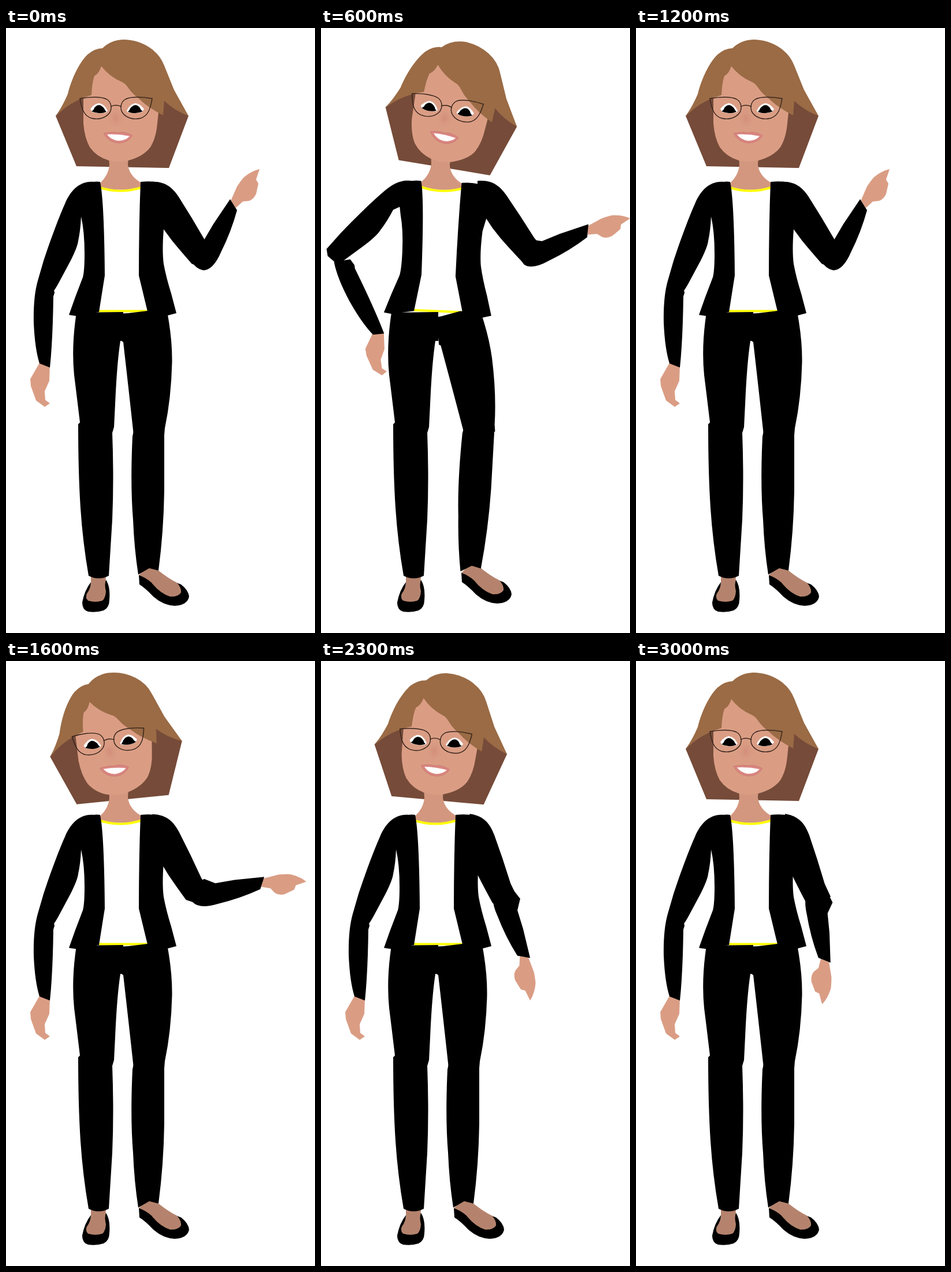
Recreate the animation shown at these times as an HTML page. Size 535x1046 px, loop 3100 ms.

```html
<!DOCTYPE html>
<html lang="en">
<head>
<meta charset="utf-8">
<title>Presenter</title>
<style>
  html, body { margin: 0; width: 100%; height: 100%; overflow: hidden; background: #fff; }
  svg { display: block; width: 100%; height: 100%; }
  .skin { fill: #da9d84; }
  .neck { fill: #d3977f; }
  .foot { fill: #b5836d; }
  .white { fill: #fff; }
  .hair { fill: #9a6b45; }
  .line { fill: none; stroke: #33221a; stroke-width: 1.4; }
</style>
</head>
<body>
<svg viewBox="0 0 535 1046">
  <defs>
    <radialGradient id="blush">
      <stop offset="0" stop-color="#d28d79"/>
      <stop offset="1" stop-color="#da9d84" stop-opacity="0"/>
    </radialGradient>
    <path id="lens" d="M128 122C144 119 164 118 174 123C183 128 184 140 179 147C172 156 160 159 148 156C135 152 131 140 128 122Z"/>
    <g id="eye">
      <path class="white" d="M146 140Q154 130 161 130Q170 131 176 143L174 146Q161 149 149 145Z"/>
      <path d="M148 144Q152 142 153 138Q161 128 170 139Q171 142 174 145Q161 150 148 144Z"/>
    </g>
  </defs>

  <!-- left foot -->
  <path class="foot" d="M147 949L147 962L138 982L142 992L168 992L174 980L172 964L173 949Z"/>
  <path d="M147 958Q136 972 132 993Q132 1006 142 1009Q157 1011 169 1007Q179 1002 179 989Q181 966 173 954Q170 962 173 974Q172 986 167 990Q155 994 142 990Q137 985 140 978Q147 968 147 958Z"/>

  <g data-part="torso">
    <path class="white" d="M163 268L233 268L231 330L230 428L245 489L244 499L161 499L171 428L169 340Z"/>
    <path fill="#ffff00" d="M162 273Q198 286 234 273L234 278Q198 289 162 278ZM161 487.5H245V491.5H161Z"/>
    <g data-part="head">
      <path fill="#764b39" d="M86 152L122 239L282 242L316 152L260 90L130 90Z"/>
    </g>
    <path class="neck" d="M178 222L179 236Q178 254 163 268L163 274Q198 285 233 274L233 267Q213 255 211 236L212 222Z"/>
    <path d="M163 266Q148 264 134 272L126 300L130 326Q136 352 136 390Q136 420 133 431L120 465L109 496L122 498L161 491L171 428Q170 300 163 266Z"/>
    <path d="M233 266Q262 263 275 272L285 300L273 348Q270 385 273 408Q277 430 286 459L295 493L280 497L245 490L230 428Q230 340 233 266Z"/>
    <g data-part="head">
      <path class="skin" d="M134 118L134 165Q136 190 145 206Q157 223 178 229Q195 233 212 229Q238 222 250 206Q260 190 262 165L267 118L220 60L150 60Z"/>
      <ellipse cx="190" cy="156" rx="17" ry="22" fill="url(#blush)"/>
      <path class="hair" d="M86 153Q99 133 107 114C114 86 127 60 141 46Q154 35 167 35Q181 21 203 20Q228 20 249 34Q267 46 274 65L291 107L316 152Q292 143 274 126L272 151Q245 137 230 122Q219 114 212 104Q206 95 200 93Q179 84 165 66Q161 79 153 83Q149 94 148 116Q110 127 86 153Z"/>
      <use href="#eye"/>
      <use href="#eye" transform="translate(385) scale(-1 1)"/>
      <g class="line">
        <use href="#lens"/>
        <use href="#lens" transform="translate(381) scale(-1 1)"/>
        <path d="M181 136Q190 131 200 136"/>
      </g>
      <path fill="#d98580" stroke="#c9776f" stroke-width=".8" d="M169 182Q178 180 187 180Q194 182 200 180Q212 181 219 186Q211 199 195 199Q177 198 169 182Z"/>
      <path class="white" d="M175 184Q195 183 214 187Q207 195 194 195Q181 193 175 184Z"/>
    </g>
  </g>

  <!-- legs and right foot -->
  <path d="M122 492L203 491L203 541L198 541Q192 580 189 650L187 690L184 700Q187 780 184 850L178 947Q160 956 143 947Q133 890 129 830Q125 770 125 685L128 682Q123 640 118 600Q113 550 122 492Z"/>
  <g data-part="foot">
    <path d="M230 946L231 962Q242 969 255 983Q272 998 292 999Q314 998 317 983Q316 972 303 962L270 950Z"/>
    <path class="foot" d="M230 946L246 930L262 931L264 938Q280 951 296 959Q304 968 303 976Q298 984 284 983Q266 977 252 959Q242 950 230 946Z"/>
  </g>
  <path data-part="shin" d="M221 697L219 706Q215 790 220 850Q222 900 229 945L248 934L264 938Q273 870 274 800L274 698Z"/>
  <path data-part="thigh" d="M203 493.5L212 493L245 489L280 496Q288 540 287.5 578Q286 640 275 692L274 704L221 704Q213 630 203 543L200 541Z"/>

  <!-- arms -->
  <g data-part="foreL">
    <path data-part="handL" class="skin" d="M58 579L42 607L43 619L52 644L67 655L76 649L68 643L67 628L75 610L76 583Z"/>
    <path d="M55 437Q47 465 48 510Q50 555 58 580L76 587Q81 540 82 464L84 458L82 446Z"/>
  </g>
  <path data-part="upperL" d="M152 266C127 264 111 282 102 304C89 333 73 378 64 406L55 437L62 447L84 453L90 443L112 402Q124 378 125 368Q129 350 130 326L152 300Z"/>
  <g data-part="foreR">
    <path data-part="handR" class="skin" d="M389 299L400 274Q408 262 412 258Q425 247 439 244L433 262L437 269L433 287Q428 297 420 299L410 300L398 311Z"/>
    <path d="M324 378L342 368L359 339L388 296L400 315Q390 352 372 388Q359 418 342 419Q329 417 320 402Z"/>
  </g>
  <path data-part="upperR" d="M250 266C276 264 289 277 299 292L322 329L345 368L360 387L354 394L340 412L322 408Q300 383 287 367L273 348L250 310Z"/>
</svg>
<script>
  const STEP = 100, LOOP = 3100, STEPS_PER_POSE = 6;
  const still = [0, 0, 0];
  const sway = (x, y, r) => [still, [x, y, r], still, still, still, still];
  const turn = (...angles) => angles.map(r => [0, 0, r]);

  // Each part: its joint, then [dx, dy, degrees] for the six key poses.
  const parts = {
    torso:  { joint: [200, 491], poses: sway(0, 0, 2.67) },
    head:   { joint: [195, 240], poses: turn(0, 5.7, 0, -10.2, 7, 0) },
    upperL: { joint: [148, 300], poses: sway(4.5, -1.5, 25.5) },
    foreL:  { joint: [70, 445],  poses: sway(-30.5, -40.5, -27) },
    handL:  { joint: [67, 584],  poses: sway(0, 0, 22.5) },
    upperR: { joint: [262, 300], poses: [still, [22, -2, -2], still, [0, 0, 8], [0, 0, 13.5], [0, 0, 13.5]] },
    foreR:  { joint: [343, 395], poses: [still, [24, -4.5, 37.5], still, [-1, 11, 75], [-28, 20, 144], [-28, 20, 144]] },
    handR:  { joint: [394, 306], poses: turn(0, 0, 0, 3, 3, 3) },
    thigh:  { joint: [245, 530], poses: sway(2, 0, -8.5) },
    shin:   { joint: [247, 702], poses: sway(26, -4, 3.2) },
    foot:   { joint: [248, 940], poses: sway(13, -4, 0) }
  };
  const nodes = [...document.querySelectorAll('[data-part]')];

  function draw(ms) {
    const pos = Math.floor((ms % LOOP) / STEP) / STEPS_PER_POSE;
    const from = Math.min(Math.floor(pos), 4), mix = pos - from;
    for (const node of nodes) {
      const { joint, poses } = parts[node.dataset.part];
      const [x, y, r] = poses[from].map((v, i) => v + (poses[from + 1][i] - v) * mix);
      node.setAttribute('transform', `translate(${x} ${y}) rotate(${r} ${joint})`);
    }
  }

  const start = performance.now();
  function tick() {
    draw(performance.now() - start);
    requestAnimationFrame(tick);
  }
  tick();
</script>
</body>
</html>
```
